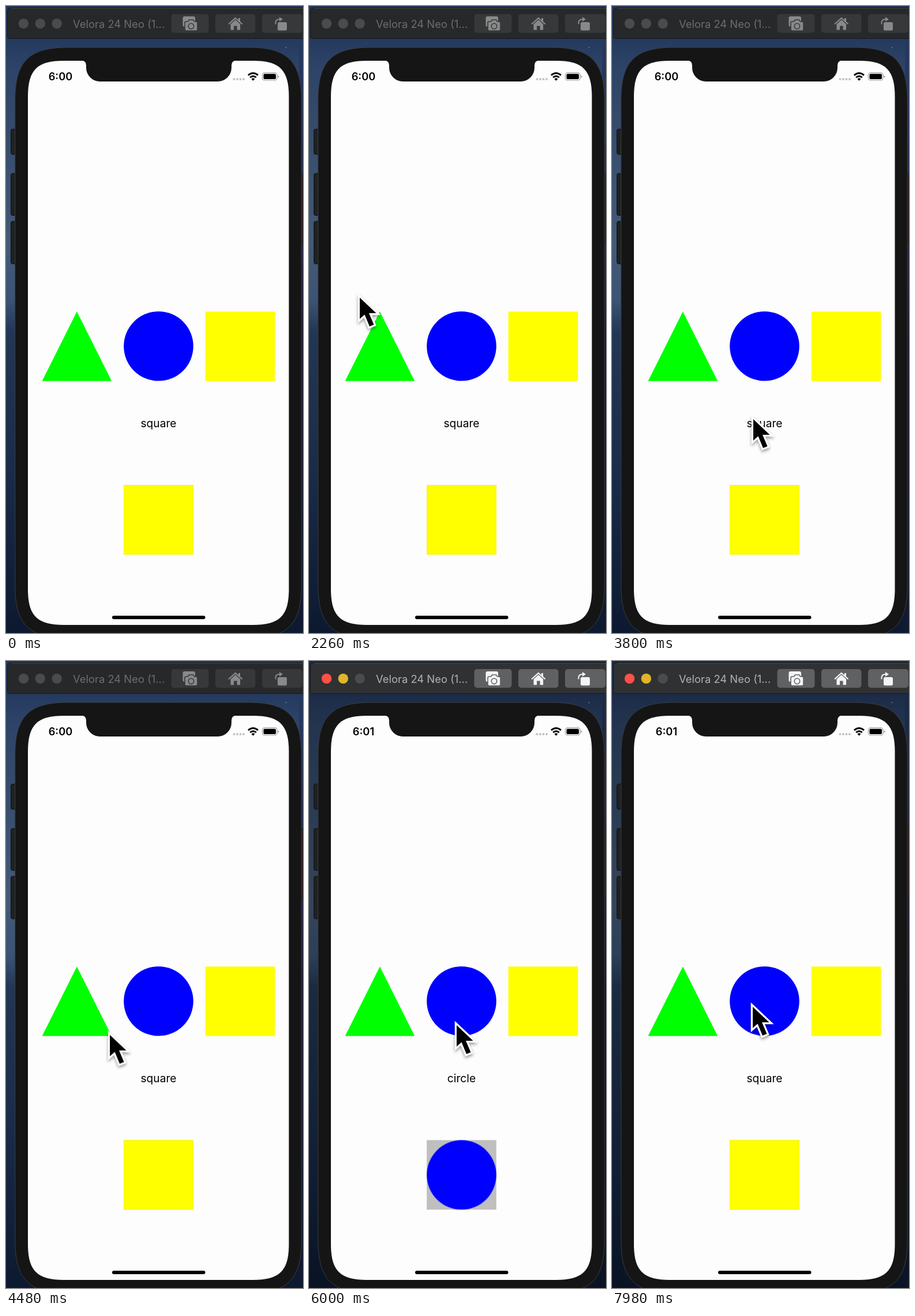
Animation of 515x1088 px, one loop 8 s. Source, as an HTML page:

```html
<!DOCTYPE html>
<html lang="en">
<head>
<meta charset="utf-8">
<title>Shape picker</title>
<style>
  html, body { margin: 0; width: 100%; height: 100%; overflow: hidden; background: #101c34; }
  svg { display: block; width: 515px; height: 1088px; }
  text { font-family: Inter, Roboto, sans-serif; }

  /* window focus */
  .chrome { animation: focus 8s step-end infinite; }
  .bar { fill: var(--bar); }
  .btn { fill: var(--btn); }
  .icon { fill: var(--icon); }
  .line { fill: none; stroke: var(--icon); }
  .gap { stroke: var(--btn); }
  .title { fill: var(--title); font-size: 18.4px; }
  .red { fill: var(--red); }
  .amber { fill: var(--amber); }
  @keyframes focus {
    0% {
      --bar: #272829; --btn: #373839; --icon: #89898a; --title: #6c6d6f;
      --red: #4a4b4d; --amber: #4a4b4d;
    }
    62.75%, 100% {
      --bar: #303132; --btn: #606163; --icon: #f4f4f4; --title: #b1b2b4;
      --red: #ff5148; --amber: #e0b52a;
    }
  }

  /* step-wise visibility */
  .before { animation: before 8s step-end infinite; }
  .after { animation: after 8s step-end infinite; }
  .pick-square { animation: square 8s step-end infinite; }
  .pick-triangle { animation: triangle 8s step-end infinite; }
  .pick-circle { animation: circle 8s step-end infinite; }
  @keyframes before { 0% { opacity: 1; } 62.75%, 100% { opacity: 0; } }
  @keyframes after { 0% { opacity: 0; } 62.75%, 100% { opacity: 1; } }
  @keyframes square { 0% { opacity: 1; } 63.75% { opacity: 0; } 86.25%, 100% { opacity: 1; } }
  @keyframes triangle { 0% { opacity: 0; } 63.75% { opacity: 1; } 73.75%, 100% { opacity: 0; } }
  @keyframes circle { 0% { opacity: 0; } 73.75% { opacity: 1; } 86.25%, 100% { opacity: 0; } }

  .label { font-size: 19.2px; text-anchor: middle; }
  .clock { font-size: 18.3px; font-weight: 600; text-anchor: middle; }

  .cursor {
    filter: drop-shadow(0 3px 2.5px rgba(0, 0, 0, .38));
    animation: move 8s ease-in-out infinite;
  }
  @keyframes move {
    0%, 21.25% { transform: translate(-50px, 350px); animation-timing-function: ease-out; }
    28.25%, 29.25% { transform: translate(88px, 506px); }
    35.25%, 36.25% { transform: translate(161px, 611px); }
    47.5%, 48.5% { transform: translate(245px, 717px); }
    59%, 65% { transform: translate(167px, 635px); }
    72.5%, 75% { transform: translate(256px, 632px); }
    82.5%, 87.5% { transform: translate(385px, 632px); }
    97%, 100% { transform: translate(244px, 600px); }
  }
</style>
</head>
<body>
<svg viewBox="0 0 515 1088">
  <defs>
    <linearGradient id="sea" x2="0" y2="1">
      <stop offset="0" stop-color="#22365a"/>
      <stop offset=".055" stop-color="#253a5f"/>
      <stop offset=".1" stop-color="#2d4468"/>
      <stop offset=".2" stop-color="#354c6c"/>
      <stop offset=".38" stop-color="#445a77"/>
      <stop offset=".47" stop-color="#3b5375"/>
      <stop offset=".52" stop-color="#223755"/>
      <stop offset=".75" stop-color="#192b49"/>
      <stop offset="1" stop-color="#0c1930"/>
    </linearGradient>
    <linearGradient id="dusk" x2="0" y2="1">
      <stop offset="0" stop-color="#253a5f"/>
      <stop offset=".3" stop-color="#25294d"/>
      <stop offset=".5" stop-color="#1c1830"/>
      <stop offset="1" stop-color="#101a30"/>
    </linearGradient>
    <polygon id="tri" points="60.3,0 120.6,120.6 0,120.6"/>
    <circle id="disc" cx="60.300" cy="60.300" r="60.300"/>
    <rect id="box" width="120.600" height="120.600"/>
  </defs>

  <!-- desktop -->
  <rect width="515" height="1088" fill="url(#sea)"/>
  <rect x="508" y="57" width="7" height="1031" fill="url(#dusk)"/>
  <rect class="after" width="515" height="1088" opacity="0" fill="#000" fill-opacity=".24"/>
  <circle cx="485.500" cy="72" r=".8" fill="#aab4c8"/>

  <!-- title bar -->
  <g class="chrome">
    <path class="bar" d="M2.500 10q0-7 7-7H516V56.500H6q-3.500 0-3.500-3.500z" stroke="#15181d"/>
    <path d="M9 4H515" stroke="#fff" stroke-opacity=".16"/>
    <circle class="red" cx="30.500" cy="30.500" r="8.700"/>
    <circle class="amber" cx="59.300" cy="30.500" r="8.700"/>
    <circle cx="88.200" cy="30.500" r="8.700" fill="#4a4b4d"/>
    <text class="title" x="116" y="37.500">Velora 24 Neo (1...</text>
    <rect class="btn" x="286.500" y="14" width="65" height="32.500" rx="5"/>
    <rect class="btn" x="363" y="14" width="69.500" height="32.500" rx="5"/>
    <rect class="btn" x="444" y="14" width="70" height="32.500" rx="5"/>
    <g class="icon">
      <rect x="306.500" y="18" width="21.500" height="18" rx="3"/>
      <path class="gap" stroke-width="1.600" d="M312 27h3.500l2-3h7l2 3h3q2.500 0 2.500 2.500v11q0 2.500-2.500 2.500h-17q-2.500 0-2.500-2.500v-11q0-2.500 2-2.500z"/>
      <circle class="gap" cx="321" cy="35" r="4.700" stroke-width="1.600"/>
      <path d="M389.500 31.500l8.300-7.500 8.300 7.500V41.500h-5.500v-7h-5.500v7h-5.600z"/>
      <rect x="403" y="21" width="3" height="6"/>
      <rect x="471" y="28" width="16" height="14.500" rx="2.500"/>
      <path d="M474 19l6 4-6 4z"/>
    </g>
    <path class="line" stroke-width="2.200" d="M386 31.500l11.800-10.500 11.800 10.500"/>
    <path class="line" stroke-width="2" d="M467.500 31.500v-2.500q0-6 7-6"/>
  </g>

  <!-- phone -->
  <g fill="#202122" stroke="#0e1013">
    <rect x="8.500" y="213.500" width="12" height="44" rx="3"/>
    <rect x="8.500" y="290.500" width="12" height="73" rx="3"/>
    <rect x="8.500" y="373.500" width="12" height="74" rx="3"/>
    <rect x="505" y="290.500" width="14" height="122" fill="#2a1d20"/>
  </g>
  <path fill="#151515" stroke="#3a3e42" d="M15.800 163c0-67 24-91 91-91h314.400c67 0 91 24 91 91v843c0 67-24 91-91 91h-314.400c-67 0-91-24-91-91z"/>
  <path fill="#fdfdfd" d="M38 157c0-46 16-62 62-62h328.500c46 0 62 16 62 62v855c0 46-16 62-62 62h-328.500c-46 0-62-16-62-62z"/>
  <path fill="#151515" d="M131 94.500Q139 95 139 103V107A24 24 0 0 0 163 131H367A24 24 0 0 0 391 107V103Q391 95 399 94.500z"/>

  <!-- status bar -->
  <g class="clock">
    <text class="before" x="94.500" y="129">6:00</text>
    <text class="after" x="94.500" y="129" opacity="0">6:01</text>
  </g>
  <path d="M395.500 127h17" stroke="#c2c2c2" stroke-width="4" stroke-linecap="round" stroke-dasharray="0 5.500"/>
  <g fill="none" stroke="#000" stroke-width="2.900">
    <path d="M420 120.200q8.500-7.400 17 0"/>
    <path d="M423.200 124q5.300-4.600 10.600 0"/>
  </g>
  <path d="M425.500 126.500q3-2.400 6 0l-3 3.300z"/>
  <rect x="444.500" y="115.800" width="25.500" height="13.200" rx="4" fill="none" stroke="#9b9b9b" stroke-width="1.200"/>
  <rect x="446.500" y="117.800" width="21.500" height="9.200" rx="2"/>
  <path d="M471.500 120.200q2 .8 2 2.200t-2 2.200z" fill="#9b9b9b"/>

  <!-- shapes -->
  <use href="#tri" x="62.600" y="530.200" fill="#0f0"/>
  <use href="#disc" x="204.200" y="530" fill="#00f"/>
  <use href="#box" x="345.700" y="530.200" fill="#ff0"/>

  <!-- current pick -->
  <g transform="translate(204.200 831.400)">
    <use href="#box" fill="#bfbfbf"/>
    <use href="#box" class="pick-square" fill="#ff0"/>
    <use href="#tri" class="pick-triangle" fill="#0f0" opacity="0"/>
    <use href="#disc" class="pick-circle" fill="#00f" opacity="0"/>
  </g>
  <g class="label">
    <text class="pick-square" x="264.500" y="730.500">square</text>
    <text class="pick-triangle" x="264.500" y="730.500" opacity="0">triangle</text>
    <text class="pick-circle" x="264.500" y="730.500" opacity="0">circle</text>
  </g>
  <rect x="184" y="1058" width="161.500" height="6" rx="3"/>

  <g class="cursor">
    <path d="M0 0V37L8.500 29.500 17 50 24.500 47 16 27H28.500z" stroke="#fff" stroke-width="6.500" paint-order="stroke"/>
  </g>
</svg>
</body>
</html>
```
